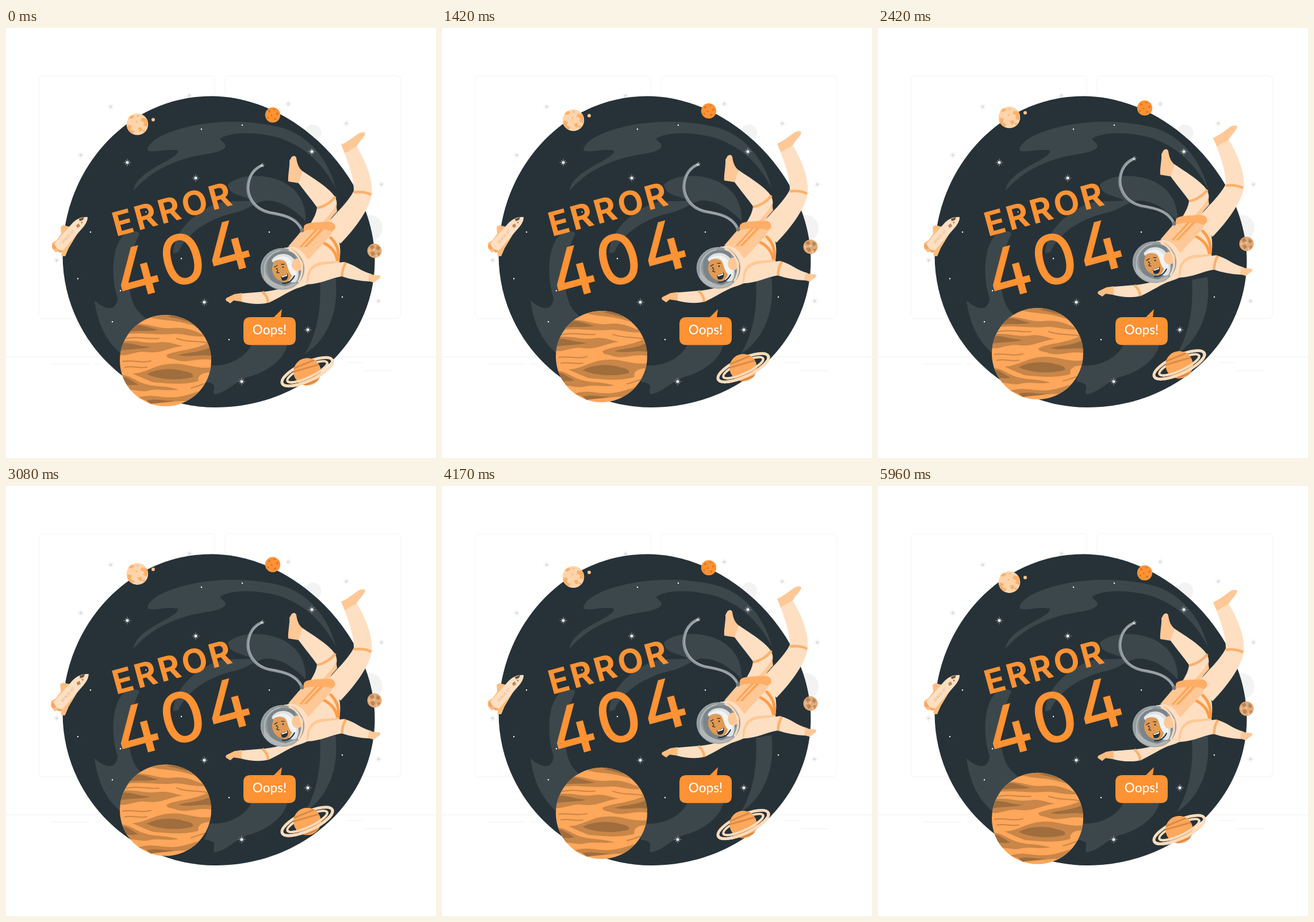
Animation, 748 px wide and 748 px high, one loop 6 s. Source, as an HTML page:

```html
<!DOCTYPE html>
<html lang="en">
<head>
<meta charset="utf-8">
<title>Error 404</title>
<style>
  html, body { margin: 0; width: 100%; height: 100%; overflow: hidden; background: #fff; }
  svg { display: block; width: 100vw; height: 100vh; }
  text { font-family: Inter, "Open Sans", sans-serif; }
  .code { font-feature-settings: "cv02"; }
  .word { font-family: Lato, "Open Sans", sans-serif; }
  .line { fill: none; stroke-linecap: round; }
  .pale { fill: #ffdfc2; }
  .peach { fill: #ffc896; }
  .band { fill: none; stroke: #ffb06b; stroke-width: 4.5; }
</style>
</head>
<body>
<svg viewBox="0 0 748 748">
  <defs>
    <clipPath id="giantClip"><circle cx="277.5" cy="578.5" r="79.5"/></clipPath>
    <clipPath id="paleClip"><circle cx="228.5" cy="167.5" r="19"/></clipPath>
    <clipPath id="ringedClip"><circle cx="524" cy="598" r="24"/></clipPath>
    <clipPath id="glassClip"><ellipse cx="481" cy="419" rx="38" ry="36"/></clipPath>
  </defs>

  <g class="line" stroke="#f5f5f5" stroke-width="1.2">
    <rect x="57.500" y="83" width="305.500" height="422.500" rx="7"/>
    <rect x="381" y="83" width="305.500" height="422.500" rx="7"/>
    <path stroke="#efefef" d="M0 572H748M80 584.500H143M155 584.500H165M594 582H620M624 596H672"/>
  </g>
  <circle cx="534" cy="182.500" r="14.500" fill="#f3f3f3"/>
  <circle cx="632" cy="348" r="23" fill="#f3f3f3"/>
  <g id="greyStars" fill="#dcdcdc"></g>

  <path fill="#263238" d="M357 118.500C502 118.500 641.500 259 641.500 405C641.500 546 518 660 365 660C218 660 98.500 541 98.500 395C98.500 242 214 118.500 357 118.500Z"/>
  <g fill="#3c474c">
    <path d="M222 283C224 262 250 247 280 231C292 224 303 217 298 213C280 209 258 218 246 213C247 193 290 176 335 168C390 159 440 163 482 174C530 190 561 230 574 280C551 235 520 207 478 192C435 179 390 181 373 192C372 197 382 198 382 206C375 219 345 218 316 226C275 238 245 256 222 283Z"/>
    <path d="M291 392C291 362 316 328 362 307C384 298 405 303 428 300C410 290 388 292 386 272C406 254 446 253 478 266C508 280 523 306 521 336C503 317 480 300 452 300C434 303 420 316 400 321C352 331 313 358 300 390Z"/>
    <path d="M154 474C165 484 191 500 194 470C181 430 185 380 204 361C214 353 230 351 232 358C211 400 209 450 222 480C230 500 250 505 254 520L204 570C178 550 160 520 154 474Z"/>
    <path d="M355 587C386 590 420 572 428 548C440 525 470 533 490 546C488 575 452 599 425 606C400 612 385 635 362 637C359 625 371 619 345 615Z"/>
    <path d="M546 438L573 433C580 488 562 540 520 567C542 530 549 486 546 438Z"/>
  </g>
  <g id="whiteStars" fill="#fff"></g>

  <g fill="#ff9233">
    <text transform="translate(191.500 363) rotate(-15.200)" font-size="58" font-weight="700" letter-spacing="4.400">ERROR</text>
    <text class="code" transform="translate(320 443.500) rotate(-15.200)" font-size="120" font-weight="500" letter-spacing="4" text-anchor="middle">404</text>
    <path d="M425 503H466L480 489L478 503H492Q504 503 504 515V539.500Q504 551.500 492 551.500H425Q413 551.500 413 539.500V515Q413 503 425 503Z"/>
  </g>
  <text class="word" x="458.500" y="533" font-size="22.500" font-weight="500" text-anchor="middle" fill="#fff">Oops!</text>
  <circle cx="243.500" cy="320" r="1" fill="#fff"/>

  <g id="planets">
    <g clip-path="url(#giantClip)">
      <path fill="#ffa75b" d="M190 490H365V665H190Z"/>
      <g fill="#c88648">
        <path d="M240 500C262 509 285 507 310 513C325 517 333 520 342 522L300 496Z"/>
        <path d="M222 515C250 513 262 524 287 522C315 519 330 528 350 536C325 539 310 531 292 532C262 535 240 529 212 532Z"/>
        <path d="M196 546C222 540 239 550 263 547C283 544 290 550 308 553C282 556 273 566 247 564C225 560 212 573 194 568Z"/>
        <path d="M279 569C303 558 325 563 360 544V578C335 572 315 585 295 577C288 574 280 576 279 569Z"/>
        <path d="M220 601C246 600 260 584 290 584C315 583 329 594 360 590V599C340 598 332 606 335 614C310 622 277 618 255 616C243 611 233 607 220 601Z"/>
        <path d="M196 603C217 603 225 615 245 620C265 625 278 622 300 629C275 632 265 627 247 631C235 634 223 628 205 629Z"/>
        <path d="M230 643C255 635 270 645 297 642C316 640 330 632 350 629L330 650C305 646 285 652 258 653Z"/>
      </g>
      <g fill="#a06d3d">
        <path d="M220 517C240 515 248 522 266 525C248 529 231 525 212 529Z"/>
        <path d="M197 549C216 545 224 553 252 555C234 559 218 558 196 561Z"/>
        <path d="M300 569C322 563 338 565 360 553V571C339 566 321 574 300 569Z"/>
        <path d="M245 602C262 592 292 591 309 597C321 599 327 602 325 607C302 614 264 612 245 602Z"/>
        <path d="M198 606C210 606 219 614 230 620C221 623 212 620 202 621Z"/>
        <path d="M280 501C291 505 305 506 316 511L305 499Z"/>
        <path d="M244 648C261 644 272 649 292 648C278 652 265 651 252 654Z"/>
      </g>
      <path class="line" stroke="#c88648" stroke-width="2" d="M206 541C229 535 242 542 266 540M297 540C318 548 333 543 351 548M203 580C224 577 235 584 252 579M207 590C224 587 230 593 245 590M322 626C333 624 340 619 350 618"/>
    </g>

    <g clip-path="url(#paleClip)">
      <circle cx="228.500" cy="167.500" r="19" fill="#ffd4aa"/>
      <path fill="#ffb06a" d="M216 151L224 153L219 158L213 157ZM236 156L247 158L246 172L239 170L240 164L234 161ZM212 168L219 170L217 176L224 180L220 184L210 177ZM229 174L235 172L238 177L233 181Z"/>
      <g fill="#ffb06a"><circle cx="227" cy="163" r="1.500"/><circle cx="240" cy="179" r="2"/><circle cx="229" cy="153" r="1.500"/></g>
    </g>
    <circle cx="256" cy="159.500" r="3" fill="#ffc58f"/>

    <circle cx="464" cy="151.300" r="13.200" fill="#ff9233"/>
    <g fill="#d5772b">
      <circle cx="458" cy="145" r="2"/><circle cx="467" cy="142" r="1.600"/><circle cx="472" cy="149" r="2"/>
      <circle cx="462" cy="152" r="1.500"/><circle cx="456" cy="156" r="1.700"/><circle cx="468" cy="158" r="2"/>
    </g>

    <circle cx="641" cy="387.500" r="12.500" fill="#e2aa78"/>
    <path fill="#b98555" d="M632 380L638 377L641 382L636 385ZM645 378L651 382L648 387L644 384ZM634 390L640 389L642 394L637 397ZM646 391L651 391L648 397Z"/>
    <path fill="#ffd0a0" d="M639 384L643 386L640 388ZM631 386L634 387L632 390ZM643 396L646 395L645 399Z"/>

    <g class="line" stroke="#ffdcbb" transform="rotate(-25 524 598)">
      <ellipse cx="524" cy="598" rx="48" ry="15.500" stroke-width="5"/>
      <ellipse cx="524" cy="598" rx="38" ry="10" stroke-width="4"/>
    </g>
    <g clip-path="url(#ringedClip)">
      <circle cx="524" cy="598" r="24" fill="#ffa75b"/>
      <path class="line" stroke="#d88b47" stroke-width="3" d="M501 592L542 575M500 598L549 584M508 618L548 602M518 622L544 612"/>
    </g>
    <g class="line" stroke="#ffdcbb" transform="rotate(-25 524 598)">
      <path stroke-width="5" d="M476 598A48 15.500 0 0 0 572 598"/>
      <path stroke-width="4" d="M486 598A38 10 0 0 0 562 598"/>
    </g>
  </g>

  <g id="rocket">
    <path fill="#ffbd80" d="M112 346L100 343L95 346L96 358L88 369L80 374L80 383L86 390L96 388L97 397L103 397L109 383L124 358Z"/>
    <path fill="#f7a661" d="M84 374L80 379L83 385L90 383ZM90 386L93 391L98 389L97 384Z"/>
    <path fill="#ffdfc2" d="M142 329C130 328 122 333 115 340L84 375C87 383 92 387 99 387L133 348C139 341 142 335 142 329Z"/>
    <path fill="#6d5239" d="M127 332L136 329L134 334L128 336Z"/>
    <path fill="#b98a61" d="M122 343L127 340L129 345L124 348ZM130 337L134 337L132 341Z"/>
    <text transform="translate(99 376) rotate(-48)" font-size="6.500" fill="#e4ae7f">SPACE 07</text>
  </g>

  <g id="astronaut">
    <path class="peach" d="M497 224Q503 220 505 226C507 239 510 244 517 250L510 270L491 267C490 256 494 240 493 231Z"/>
    <path class="pale" d="M516 249C535 262 554 273 567 287C577 298 579 308 568 326L557 348L528 343C536 330 540 322 541 312C532 299 520 285 509 270Z"/>
    <path class="band" d="M541 313C553 311 566 303 573 293"/>
    <path class="peach" d="M583 203C595 198 606 188 614 183Q623 179 625 184C622 193 612 199 609 209L590 220Z"/>
    <path class="pale" d="M589 218L610 206C625 230 639 263 636 291C632 314 610 346 582 375L553 347C570 325 595 304 605 283C605 262 597 239 589 218Z"/>
    <path class="band" d="M605 286C616 284 628 286 635 290"/>
    <path class="peach" d="M552 347C561 337 567 329 576 319L574 305C571 320 555 331 546 344Z"/>

    <path class="pale" d="M504 446C480 453 463 458 444 459L408 462L409 476C428 481 447 481 459 477C482 466 497 454 520 448Z"/>
    <path fill="#ffbd80" d="M410 461L397 463L383 470Q381 474 384 475L390 479L396 474L410 476Z"/>
    <path class="band" d="M446 459C452 464 456 470 456 478"/>

    <path class="pale" d="M468 389L494 380L525 343L572 350C581 367 584 390 579 408C557 426 535 448 492 456Z"/>
    <path class="line" stroke="#ff9c47" stroke-width="5" stroke-linecap="butt" d="M553 374C568 382 575 392 577 408M565 365C575 375 580 389 578 404"/>
    <path class="peach" d="M491 380L520 346L573 347L561 365L526 403C519 397 517 381 491 380Z"/>
    <path fill="#ffae68" d="M518 346C520 338 535 338 564 337Q575 340 572 350L566 354C555 348 535 350 518 353Z"/>
    <path fill="#ffa75b" d="M510 381L539 349L553 350L523 381Z"/>
    <path class="line" stroke="#ffdfc2" stroke-width="1.500" d="M544 351L517 380"/>

    <path class="peach" d="M523 446C522 426 528 411 548 407L580 405L582 416L548 425Z"/>
    <path class="pale" d="M527 437C528 418 540 413 557 411L588 407C606 411 618 424 636 428L634 441C614 440 599 437 584 432C565 435 549 445 524 446Z"/>
    <path class="band" d="M591 408C587 415 584 423 585 432"/>
    <path class="peach" d="M632 427C640 431 646 429 651 431Q652 435 646 438L640 443L630 440Z"/>

    <path class="pale" d="M484 382C508 383 523 398 521 421C518 442 507 454 487 456Z"/>
    <path class="line" stroke="#ffc896" stroke-width="2" d="M497 384C520 394 521 436 497 453"/>
    <g clip-path="url(#glassClip)">
      <ellipse cx="481" cy="419" rx="38" ry="36" fill="#929a9d"/>
      <path fill="#7b8488" d="M455 407C460 389 485 383 502 393L512 425L488 451C462 449 451 430 455 407Z"/>
      <path fill="#b3b6b7" d="M449 422C455 436 466 446 486 449L506 443L497 456L470 455L448 440Z"/>
      <path fill="#dfe2e4" d="M462 404C469 392 487 389 498 399C511 409 511 432 505 441C497 446 487 438 482 430Z"/>
      <path fill="#e19a53" d="M466 406C474 401 483 403 490 409L497 430C494 442 486 444 478 440C467 437 462 425 463 416Z"/>
      <path fill="#f1f3f4" d="M462 408C469 397 485 394 493 402C504 412 507 424 504 434L496 429C489 420 490 407 482 402C476 401 470 402 462 408Z"/>
      <path class="line" stroke="#263238" stroke-width="1.300" d="M467 416L472 413M479 411L484 411M473 421L471 425L475 426"/>
      <circle cx="471" cy="419" r="1.300" fill="#263238"/><circle cx="482" cy="416" r="1.300" fill="#263238"/>
      <path fill="#263238" d="M478 432C484 431 487 429 490 427C492 436 488 441 480 439Z"/>
      <path fill="#fff" d="M479 432C484 431 487 430 489 428L489 431L480 434Z"/>
      <path class="line" stroke="#263238" stroke-width="2" d="M481 444C490 445 497 440 502 431"/>
      <path class="line" stroke="#b4babd" stroke-width="2" d="M451 428C445 408 459 391 477 387"/>
    </g>
    <ellipse cx="481" cy="419" rx="37.500" ry="35.500" fill="none" stroke="#9fa6a9" stroke-width="1.500"/>
    <ellipse cx="507" cy="412" rx="10" ry="11" fill="#ffc896"/>
    <path class="line" stroke="#ffdfc2" stroke-width="3" d="M493 386C513 394 522 419 509 441"/>

    <path class="line" stroke="#8c959a" stroke-width="5" d="M515 352C506 330 483 325 458 321C426 313 416 286 423 264C427 250 436 243 445 239"/>
    <path class="line" stroke="#a8afb3" stroke-width="1.500" d="M513 349C502 330 482 325 458 320C428 312 418 285 424 264C428 251 436 244 444 240"/>
    <path class="line" stroke="#dfe3e5" stroke-width="1" d="M443 240L449 238M443 239L447 235M444 240L448 241"/>
    <circle cx="515" cy="352" r="3.500" fill="#737d82"/>
  </g>
</svg>
<script>
  const $ = id => document.getElementById(id);

  function star(x, y, r, core) {
    let d = "";
    for (let i = 0; i < 16; i++) {
      const reach = i % 2 ? r * 0.17 : i % 4 ? r * 0.8 : r;
      const a = i * Math.PI / 8;
      d += `${i ? "L" : "M"}${x + reach * Math.sin(a)} ${y - reach * Math.cos(a)}`;
    }
    return `<path d="${d}Z"/><circle cx="${x}" cy="${y}" r="${core}"/>`;
  }

  $("greyStars").innerHTML = [
    [182, 137], [319, 118], [491, 132], [592, 166], [130, 221],
    [88, 404], [653, 272], [648, 475], [143, 540]
  ].map(([x, y]) => star(x, y, 8, 1.6)).join("");

  $("whiteStars").innerHTML = [
    [211, 234], [330, 261], [532, 215], [345, 477], [525, 525], [410, 615]
  ].map(([x, y]) => star(x, y, 8, 2)).join("") + [
    [340, 176], [411, 169], [147, 355], [199, 457], [458, 355],
    [305, 401], [125, 436], [185, 511], [388, 542], [585, 468]
  ].map(([x, y]) => `<circle cx="${x}" cy="${y}" r="1.2"/>`).join("");

  const FRAME = 1000 / 24;
  const LOOP = 6000;
  const RISE = 14.96;

  // Linear drift up and back down within one period.
  const float = (t, period) => -RISE * (1 - Math.abs(1 - 2 * (t % period) / period));

  // Two beats, then a rest: [phase, scale].
  const BEAT = [[0, 1], [0.1, 1.1], [0.3, 1], [0.4, 1], [0.5, 1.1], [0.6, 1], [1, 1]];

  function beat(t) {
    const p = t % 1500 / 1500;
    const i = BEAT.findIndex(step => p < step[0]);
    const [p0, s0] = BEAT[i - 1], [p1, s1] = BEAT[i];
    return s0 + (s1 - s0) * (p - p0) / (p1 - p0);
  }

  const start = performance.now();

  function draw() {
    const clock = Math.max(0, performance.now() - start) % LOOP;
    const t = Math.floor((clock + 4) / FRAME) * FRAME;
    $("planets").setAttribute("transform", `translate(0 ${float(t, LOOP)})`);
    $("astronaut").setAttribute("transform", `translate(0 ${float(t, 1500)})`);
    $("rocket").setAttribute("transform", `translate(110.5 363) scale(${beat(t)}) translate(-110.5 -363)`);
    requestAnimationFrame(draw);
  }
  draw();
</script>
</body>
</html>
```
